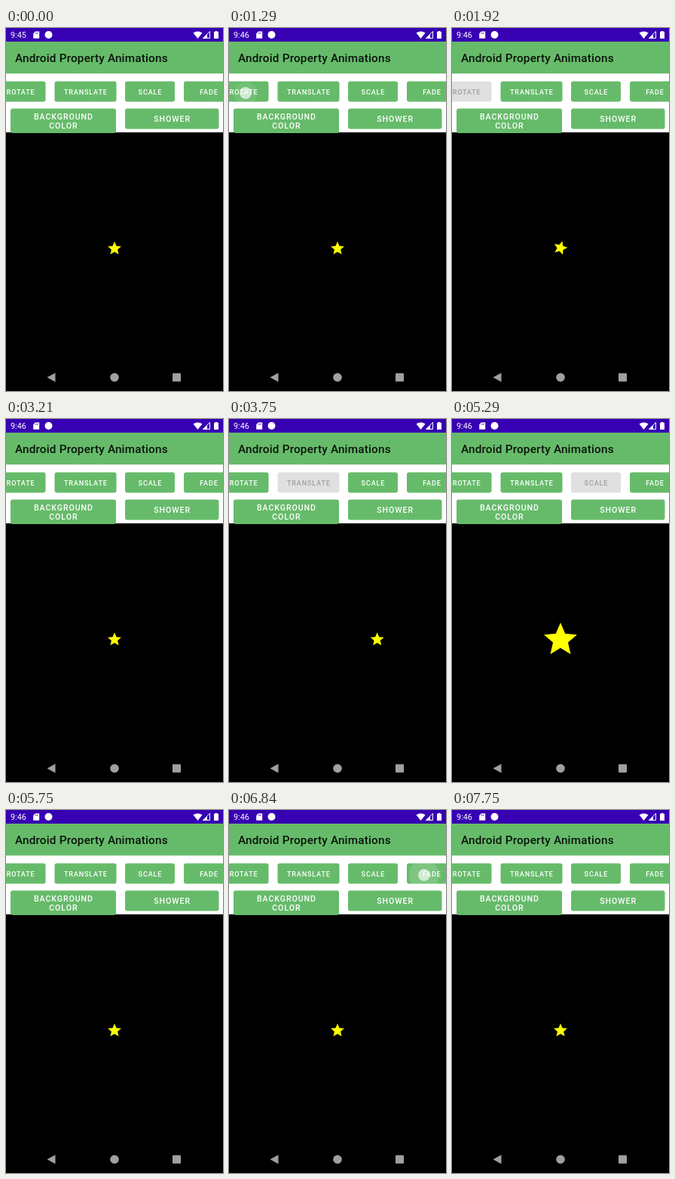
An HTML page for the animation above (8 s loop, 288 by 480 pixels).

```html
<!DOCTYPE html>
<html lang="en">
<head>
<meta charset="utf-8">
<title>Property animations</title>
<style>
  html, body { margin: 0; width: 100%; height: 100%; overflow: hidden; background: #000; }
  svg { display: block; width: 288px; height: 480px; font-family: Roboto, "Noto Sans", sans-serif; }
  .label { font-weight: 500; text-anchor: middle; fill: #fff; }
</style>
</head>
<body>
<svg id="stage" viewBox="0 0 288 480">
  <rect width="288" height="480" fill="#000"/>
  <rect y="60" width="288" height="78" fill="#fff"/>
  <rect y="60" width="288" height="1" fill="#dfeedf"/>
  <rect y="18" width="288" height="42" fill="#66bb6a"/>
  <text x="12" y="45" font-size="15.3" font-weight="500" letter-spacing=".19" fill="#0a130b">Android Property Animations</text>

  <rect width="288" height="18" fill="#3700b3"/>
  <g fill="#fff">
    <text id="clock" x="6" y="13" font-size="10.8"></text>
    <path d="M39 4.5H44.2V13.8H36.2V7.3Z"/>
    <path d="M39.8 5.8V8M41.8 5.8V8" stroke="#3700b3" stroke-width=".8"/>
    <circle cx="56.5" cy="9" r="5"/>
    <path d="M248.5 6.6Q254.5 2.6 260.5 6.6L254.5 14Z"/>
    <path d="M270.5 4.5V13.5H261.5Z" fill="none" stroke="#fff"/>
    <path d="M267 8V14H261Z"/>
    <path d="M277.5 4H280.5V5H282V14H276V5H277.5Z"/>
  </g>

  <g id="buttons"></g>
  <circle id="dot" r="7.5" fill="#fff" fill-opacity=".65" stroke="#fff" stroke-opacity=".35" stroke-width="1.5"/>
  <path id="star" fill="#ff0" d="M0 5.27L6.18 9L4.54 1.97L10 -2.76L2.81 -3.37L0 -10L-2.81 -3.37L-10 -2.76L-4.54 1.97L-6.18 9Z"/>

  <g fill="#a0a0a0">
    <path d="M54.5 462L65.5 456V468Z"/>
    <circle cx="144" cy="462" r="5.8"/>
    <rect x="221" y="456.5" width="11" height="11" rx=".8"/>
  </g>
</svg>
<script>
const LOOP = 8000, PRESS = 190, MINUTE_AT = 1210;
const GREEN = '#66bb6a', OFF = '#e0e0e0', OFF_TEXT = '#9e9e9e';
const $ = id => document.getElementById(id);

function add(parent, tag, attrs, text = '') {
  const node = document.createElementNS('http://www.w3.org/2000/svg', tag);
  set(node, attrs);
  node.textContent = text;
  parent.append(node);
  return node;
}

function set(node, attrs) {
  for (const key in attrs) node.setAttribute(key, attrs[key]);
}

function button(x, y, w, h, size, lines, tapX) {
  const group = add($('buttons'), 'g', {});
  const box = { x, y, width: w, height: h, rx: 3 };
  const id = 'clip' + x;
  add(add(group, 'clipPath', { id }), 'rect', box);
  const face = add(group, 'rect', { ...box, fill: GREEN });
  const ripple = add(group, 'circle', { cx: tapX, cy: 86, r: 0, fill: '#fff', 'clip-path': `url(#${id})` });
  const labels = lines.map(([text, baseline]) => add(group, 'text', {
    class: 'label', x: x + w / 2 + .4, y: baseline, 'font-size': size, 'letter-spacing': size * .0893
  }, text));
  return { face, ripple, labels, tapX, w };
}

const small = (x, w, text, tapX) => button(x, 70.5, w, 27, 9.1, [[text, 87.5]], tapX);
const rotate = small(-14, 66.5, 'ROTATE', 22);
const translate = small(64.5, 82, 'TRANSLATE', 105);
const scale = small(158, 66, 'SCALE', 191);
const fade = small(236, 66, 'FADE', 259);
button(6, 106.5, 140, 32.5, 10.6, [['BACKGROUND', 121], ['COLOR', 133]], 0);
button(158, 106.5, 124.5, 27, 10.6, [['SHOWER', 124]], 0);

// Each action: its button, when it starts, how long it runs.
const actions = [
  { key: 'turn', target: rotate, start: 1457, length: 1000 },
  { key: 'shift', target: translate, start: 3430, length: 600 },
  { key: 'grow', target: scale, start: 5145, length: 600 },
  { key: 'hide', target: fade, start: 6985, length: 600 }
];

const clamp = v => Math.min(1, Math.max(0, v));
const ease = p => (1 - Math.cos(Math.PI * p)) / 2;
const there = p => ease(1 - Math.abs(1 - 2 * p));

function draw(t) {
  const amount = {};
  let tapX = null;

  for (const { key, target, start, length } of actions) {
    const since = t - start;
    const active = since >= 0 && since < length;
    const p = active ? since / length : 0;
    amount[key] = key === 'turn' ? ease(p) : there(p);

    const pressed = since + PRESS;
    if (pressed >= 0 && since < -25) tapX = target.tapX;

    set(target.face, { fill: active ? OFF : GREEN });
    for (const label of target.labels) label.style.fill = active ? OFF_TEXT : '';
    set(target.ripple, {
      r: 10 + target.w * .75 * clamp(pressed / 225),
      opacity: pressed < 0 ? 0 : .24 * clamp(pressed / 75) * (1 - clamp((since + 25) / 150))
    });
  }

  $('clock').textContent = t < MINUTE_AT ? '9:45' : '9:46';
  set($('dot'), { cx: tapX ?? 0, cy: 86, visibility: tapX === null ? 'hidden' : 'visible' });
  set($('star'), {
    transform: `translate(${144 + 53.3 * amount.shift} 291.2) rotate(${360 * amount.turn}) scale(${.9 * (1 + 3 * amount.grow)})`,
    opacity: 1 - amount.hide
  });
}

const begin = performance.now();
function tick() {
  draw((performance.now() - begin) % LOOP);
  requestAnimationFrame(tick);
}
tick();
</script>
</body>
</html>
```
